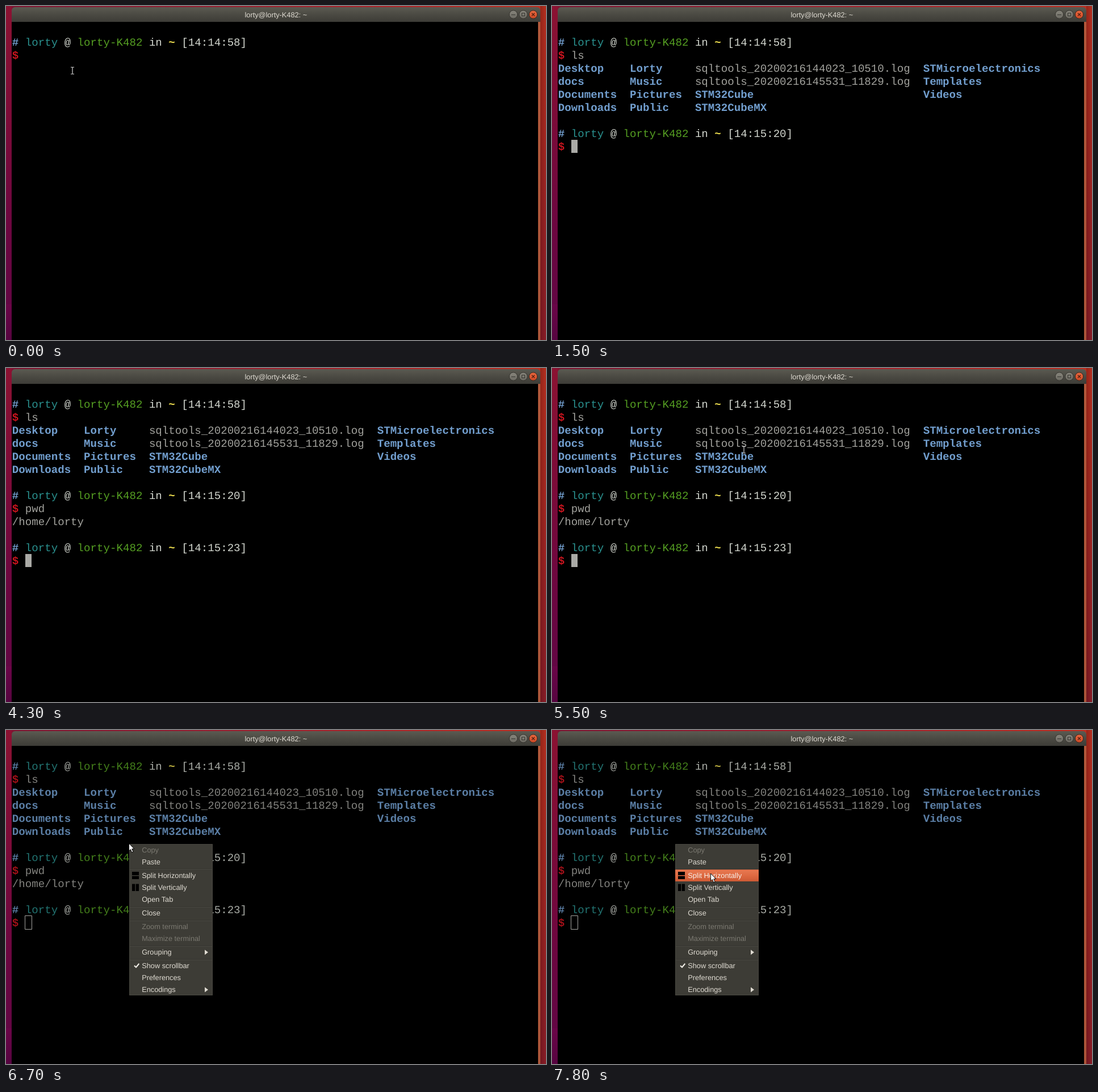
An HTML page with a canvas that plays this animation: 951x589 px, repeating every 8 s.

```html
<!DOCTYPE html>
<html lang="en">
<head>
<meta charset="utf-8">
<title>Terminal</title>
<style>
html, body { margin: 0; width: 100%; height: 100%; overflow: hidden; background: #000; }
canvas { display: block; }
</style>
</head>
<body>
<canvas id="stage" width="951" height="589"></canvas>
<script>
const ctx = document.getElementById('stage').getContext('2d');
const LOOP = 8000;
const CELL = 11.48, ROW = 23, LEFT = 10.8, TOP = 52;
const MONO = '19.13px "Liberation Mono", monospace';
const SANS = '12.75px "Liberation Sans", Arial, sans-serif';
const USER = 'lorty', HOST = 'lorty-K482';
const BLUE = '#729fcf', CYAN = '#2a918f', GREEN = '#559f22', WHITE = '#d3d7cf';
const YELLOW = '#f0e050', RED = '#c8141e', GREY = '#a2a29d';

// Typed text and cursor state [time, command line, text, cursor shown]
const TYPING = [
  [0, 0, '', 0], [200, 0, '', 1], [600, 0, 'ls', 1],
  [1500, 1, '', 1], [2000, 1, '', 0], [2100, 1, '', 1],
  [2400, 1, 'p', 1], [2700, 1, 'pw', 1], [3200, 1, 'pw', 0],
  [3800, 1, 'pw', 1], [4000, 1, 'pwd', 1],
  [4300, 2, '', 1], [4900, 2, '', 0], [5500, 2, '', 1], [6200, 2, '', 0]
];
// Pointer positions [time, x, y]
const POINTER = [
  [0, 117, 114], [600, -50, -50],
  [5300, 360, 155], [5400, 349, 148], [5500, 338, 144],
  [5700, 326, 152], [5800, 300, 174], [5900, 270, 195], [6000, 244, 210],
  [6200, 229, 208], [6300, 219, 207], [6500, 216, 200],
  [6800, 204, 212], [6900, 222, 226], [7000, 242, 216], [7100, 284, 230],
  [7200, 330, 247], [7300, 364, 252], [7400, 352, 250],
  [7600, 326, 250], [7700, 300, 252], [7800, 279, 253]
];
const FOCUS_LOST = 6500, MENU_OPEN = 6700;
const PROMPT_ROWS = [0, 7, 11];
const CLOCKS = ['14:14:58', '14:15:20', '14:15:23'];
const COMMANDS = ['ls', 'pwd'];
const LISTING = [
  ['Desktop', 'Lorty', 'sqltools_20200216144023_10510.log', 'STMicroelectronics'],
  ['docs', 'Music', 'sqltools_20200216145531_11829.log', 'Templates'],
  ['Documents', 'Pictures', 'STM32Cube', 'Videos'],
  ['Downloads', 'Public', 'STM32CubeMX', '']
];
const COLUMNS = [0, 11, 21, 56];
// Menu entries [baseline, label, kind]
const MENU = [
  [216, 'Copy', 'off'], [237, 'Paste'], [261, 'Split Horizontally'],
  [282, 'Split Vertically'], [303, 'Open Tab'], [327, 'Close'],
  [351, 'Zoom terminal', 'off'], [372, 'Maximize terminal', 'off'],
  [396, 'Grouping', 'sub'], [420, 'Show scrollbar', 'check'],
  [441, 'Preferences'], [462, 'Encodings', 'sub']
];
const RULES = [244, 311, 335, 380, 404];

const latest = (list, t) => list.filter(e => e[0] <= t).pop();

function rect(x, y, w, h, fill) {
  ctx.fillStyle = fill;
  ctx.fillRect(x, y, w, h);
}

function gradient(x0, y0, x1, y1, ...colors) {
  const g = ctx.createLinearGradient(x0, y0, x1, y1);
  colors.forEach((c, i) => g.addColorStop(i / (colors.length - 1), c));
  return g;
}

function shape(points, x, y, fill) {
  ctx.beginPath();
  points.forEach(([px, py]) => ctx.lineTo(x + px, y + py));
  ctx.closePath();
  ctx.fillStyle = fill;
  ctx.fill();
}

function lines(color, width, ...paths) {
  ctx.strokeStyle = color;
  ctx.lineWidth = width;
  ctx.beginPath();
  for (const path of paths) {
    path.forEach(([x, y], i) => i ? ctx.lineTo(x, y) : ctx.moveTo(x, y));
  }
  ctx.stroke();
}

// Characters sit on the terminal's fixed grid
function print(row, col, text, color, bold) {
  ctx.font = (bold ? 'bold ' : '') + MONO;
  ctx.fillStyle = color;
  [...text].forEach((ch, i) =>
    ctx.fillText(ch, LEFT + (col + i) * CELL, TOP + row * ROW + 17.5));
}

function drawDesktop() {
  rect(0, 0, 951, 589, gradient(0, 0, 951, 0, '#7d1432', '#931d31', '#a9232a', '#bd2e20'));
  rect(0, 0, 10, 589, gradient(0, 0, 0, 589, '#8b1232', '#7c0b38', '#6c0640', '#5f0645'));
  rect(0, 526, 10, 63, gradient(0, 526, 0, 589, '#6b0548', '#560440'));
  rect(941, 0, 10, 589, gradient(0, 0, 0, 589, '#b52e1f', '#a82820', '#982124', '#891c27'));
  rect(941, 0, 10, 589, gradient(941, 0, 951, 0, 'rgba(0,0,0,0.18)', 'rgba(0,0,0,0)'));
}

function drawButton(x, fill, edge) {
  ctx.beginPath();
  ctx.arc(x, 15, 7.2, 0, Math.PI * 2);
  ctx.fillStyle = fill;
  ctx.fill();
  ctx.strokeStyle = edge;
  ctx.lineWidth = 1;
  ctx.stroke();
}

function drawWindow() {
  ctx.beginPath();
  ctx.roundRect(10, 2, 931, 30, [6, 6, 0, 0]);
  ctx.fillStyle = gradient(0, 2, 0, 28, '#5b5a51', '#4b4a43', '#3d3c37');
  ctx.fill();
  rect(10, 28, 927, 561, '#000');
  rect(937, 28, 4, 561, gradient(0, 28, 0, 589, '#b2583a', '#ab5539'));

  ctx.font = SANS;
  ctx.textAlign = 'center';
  ctx.fillStyle = '#dfdbd2';
  ctx.fillText(`${USER}@${HOST}: ~`, 475.3, 19.5);
  ctx.textAlign = 'left';

  const grey = gradient(0, 8, 0, 22, '#87857c', '#6c6a62');
  drawButton(893.5, grey, '#35342f');
  drawButton(911, grey, '#35342f');
  drawButton(928.5, gradient(0, 8, 0, 22, '#e8683f', '#cf4a26'), '#3c241b');
  lines('#3a3934', 1.1, [[890, 15.5], [897, 15.5]]);
  ctx.strokeRect(908.5, 12.5, 5, 5);
  lines('#4a1d10', 1.1, [[926, 12.5], [931, 17.5]], [[931, 12.5], [926, 17.5]]);
}

function drawPrompt(index) {
  const row = PROMPT_ROWS[index];
  print(row, 0, '#', BLUE, true);
  print(row, 2, USER, CYAN);
  print(row, 8, '@', WHITE);
  print(row, 10, HOST, GREEN);
  print(row, 21, 'in', WHITE);
  print(row, 24, '~', YELLOW, true);
  print(row, 26, `[${CLOCKS[index]}]`, WHITE);
  print(row + 1, 0, '$', RED, true);
}

function drawListing() {
  LISTING.forEach((names, r) => names.forEach((name, c) => {
    const file = name.endsWith('.log');
    print(2 + r, COLUMNS[c], name, file ? GREY : BLUE, !file);
  }));
}

function drawTerminal(t) {
  const [, active, typed, cursor] = latest(TYPING, t);
  const focused = t < FOCUS_LOST;
  ctx.globalAlpha = focused ? 1 : 0.8;
  for (let i = 0; i <= active; i++) {
    drawPrompt(i);
    print(PROMPT_ROWS[i] + 1, 2, i < active ? COMMANDS[i] : typed, GREY);
  }
  if (active > 0) drawListing();
  if (active > 1) print(9, 0, `/home/${USER}`, GREY);
  ctx.globalAlpha = 1;

  const x = Math.round(LEFT + (2 + typed.length) * CELL);
  const y = TOP + (PROMPT_ROWS[active] + 1) * ROW;
  if (!focused) {
    ctx.strokeStyle = '#a4a4a0';
    ctx.lineWidth = 1;
    ctx.strokeRect(x - 0.5, y - 0.5, 12, 24);
  } else if (cursor) {
    rect(x, y, 11, ROW, '#aaaaa6');
  }
}

function drawMenu(t) {
  rect(217, 201, 147, 267, '#3d3c36');
  ctx.strokeStyle = '#47463f';
  ctx.lineWidth = 1;
  ctx.strokeRect(217.5, 201.5, 146, 266);
  for (const y of RULES) {
    rect(218, y, 145, 1, '#35342f');
    rect(218, y + 1, 145, 1, '#494841');
  }

  const chosen = t < 6900 ? '' : t < 7200 ? 'Paste' : 'Split Horizontally';
  ctx.font = SANS;
  for (const [y, label, kind] of MENU) {
    if (label === chosen) {
      rect(217, y - 15, 147, 21, gradient(0, y - 15, 0, y + 6, '#e97a52', '#de6a42', '#cd5a34'));
      rect(217, y - 15, 147, 1, '#c65a38');
    }
    ctx.fillStyle = kind === 'off' ? '#7b7971' : label === chosen ? '#f6f0ea' : '#dfdbd2';
    ctx.fillText(label, 239.2, y);
    if (kind === 'sub') shape([[0, -4.5], [6, 0], [0, 4.5]], 350, y - 4, '#dfdbd2');
    if (kind === 'check') {
      lines('#f0ede6', 2, [[226, y - 4.5], [229, y - 1.5], [234.3, y - 8]]);
    }
  }
  rect(222, 250, 12, 6, '#000');
  rect(222, 257.5, 12, 5.5, '#000');
  rect(222, 271.5, 5.3, 12.5, '#000');
  rect(228.7, 271.5, 5.3, 12.5, '#000');
}

function drawPointer(t) {
  const [, x, y] = latest(POINTER, t);
  if (t < FOCUS_LOST) {
    const serif = dir => [
      [x - 3, y + 6 * dir], [x - 0.8, y + 6 * dir], [x, y + 5.4 * dir],
      [x + 0.8, y + 6 * dir], [x + 3, y + 6 * dir]
    ];
    lines('#d6d6d6', 1.2, [[x, y - 5.5], [x, y + 5.5]], serif(-1), serif(1));
    return;
  }
  const arrow = [[0.5, 0], [0.5, 13.2], [3.4, 10.6], [5.6, 15.8], [8, 14.8], [5.8, 9.8], [9.8, 9.6]];
  shape(arrow, x, y, '#fff');
  ctx.lineJoin = 'round';
  ctx.strokeStyle = '#000';
  ctx.lineWidth = 1;
  ctx.stroke();
}

function frame(now) {
  const t = now % LOOP;
  ctx.textRendering = 'geometricPrecision';
  drawDesktop();
  drawWindow();
  drawTerminal(t);
  if (t >= MENU_OPEN) drawMenu(t);
  drawPointer(t);
}

const start = performance.now();
function tick() {
  frame(performance.now() - start);
  requestAnimationFrame(tick);
}
tick();
</script>
</body>
</html>
```
